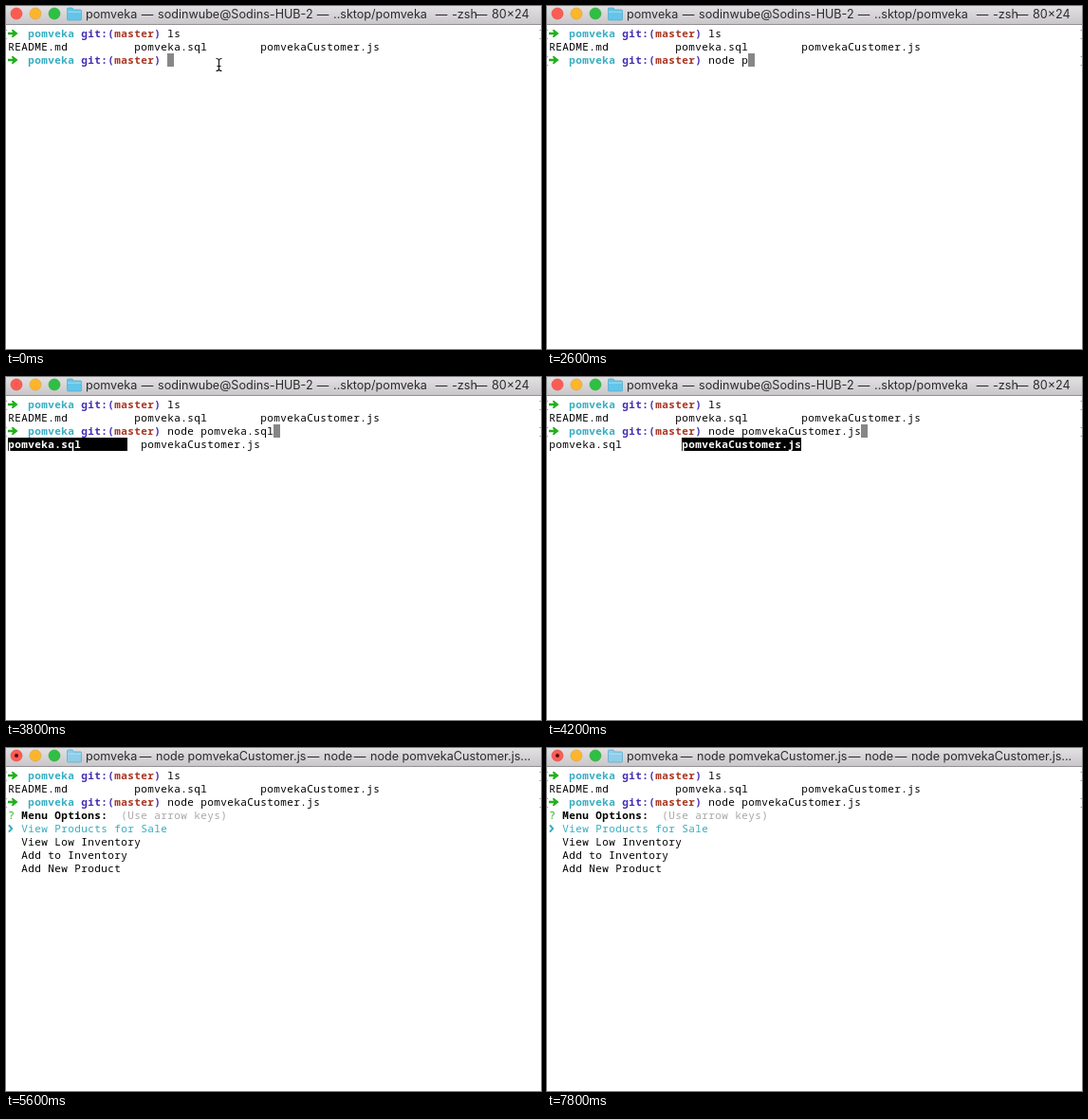
These frames come from a looping animation (564x362 px, 8000 ms). An HTML page:

```html
<!DOCTYPE html>
<html lang="en">
<head>
<meta charset="utf-8">
<title>Terminal</title>
<style>
  html, body { margin: 0; width: 100%; height: 100%; overflow: hidden; background: #fff; }
  svg { display: block; width: 564px; height: 362px; }
  text { white-space: pre; }
  .term text { font: 11px "Noto Sans Mono", "DejaVu Sans Mono", monospace; letter-spacing: .4px; }
  .term .b { font-weight: 700; }
  .bar text { font: 12.6px Inter, Roboto, sans-serif; fill: #2b2a2c; }
</style>
</head>
<body>
<svg viewBox="0 0 564 362">
  <defs>
    <linearGradient id="chrome" x2="0" y2="1">
      <stop offset="0" stop-color="#e2e0e2"/>
      <stop offset="1" stop-color="#c9c7c9"/>
    </linearGradient>
  </defs>
  <rect width="564" height="362" fill="#fff"/>
  <g class="bar">
    <rect width="564" height="19" fill="url(#chrome)"/>
    <rect y="19" width="564" height="1" fill="#929092"/>
    <g stroke-width=".6">
      <circle cx="11" cy="8" r="6" fill="#fc5b53" stroke="#df4744"/>
      <circle cx="31" cy="8" r="6" fill="#fdb52b" stroke="#de9f34"/>
      <circle cx="51" cy="8" r="6" fill="#2fbf44" stroke="#27aa35"/>
    </g>
    <g id="title"></g>
  </g>
  <g class="term" id="term"></g>
</svg>
<script>
const LOOP = 8000;
const CELL = 7, ROW = 14, LEFT = 2, TOP = 22;
const NAME = 'pomveka', SQL = NAME + '.sql', JS = NAME + 'Customer.js';
const CYAN = '#36adc2', BLUE = '#442cb4', RED = '#a8341f', GREEN = '#22b11c', GREY = '#a8a8a8';

const titleBox = document.getElementById('title');
const termBox = document.getElementById('term');

// Window titles: folder position and colour, then parts joined by dashes
const titles = {
  shell: { x: 64, fill: '#63c5e9', parts: [[84, NAME], [160, 'sodinwube@Sodins-HUB-2'], [345, '..sktop/' + NAME], [470, '-zsh'], [512, '80×24']] },
  start: { x: 73, fill: '#63c5e9', parts: [[93, NAME], [169, 'node ' + JS], [349, 'node'], [403, '-zsh'], [446, '80×24']] },
  node: { x: 64, fill: '#8fcde8', busy: true, parts: [[84, NAME], [158, 'node ' + JS], [335, 'node'], [384, 'node ' + JS + '...']] }
};

const typed = 'node ' + NAME;
const steps = [
  { at: 0, cmd: '', mouse: true },
  { at: 1200, cmd: typed.slice(0, 1) },
  { at: 1400, cmd: typed.slice(0, 3) },
  { at: 1600, cmd: typed.slice(0, 4) },
  { at: 1800, cmd: typed.slice(0, 5) },
  { at: 2000, cmd: typed.slice(0, 6) },
  { at: 2600, cmd: typed.slice(0, 6), marks: true },
  { at: 2800, cmd: typed, marks: true },
  { at: 3200, cmd: typed, marks: true, list: true },
  { at: 3800, cmd: 'node ' + SQL, marks: true, list: true, pick: SQL },
  { at: 4200, cmd: 'node ' + JS, marks: true, list: true, pick: JS },
  { at: 4800, cmd: 'node ' + JS + ' ', marks: true },
  { at: 5200, cmd: 'node ' + JS, marks: true, run: true, title: 'start' },
  { at: 5400, cmd: 'node ' + JS, marks: true, run: true, title: 'node' },
  { at: 5600, cmd: 'node ' + JS, marks: true, menu: true, title: 'node' }
];

const colX = col => LEFT + col * CELL;
const rowY = row => TOP + row * ROW;
const label = (x, y, str, fill = '#000', bold = false) =>
  `<text x="${x}" y="${y}" fill="${fill}"${bold ? ' class="b"' : ''}>${str}</text>`;
const put = (col, row, str, fill, bold) => label(colX(col) + .2, rowY(row) + 11, str, fill, bold);
const block = (col, row, cols, fill) =>
  `<rect x="${colX(col)}" y="${rowY(row)}" width="${cols * CELL}" height="${ROW}" fill="${fill}"/>`;
const cursor = (col, row) => block(col, row, 1, '#878787');
const marks = row => label(-4, rowY(row) + 10.5, '[', '#8c8c8c') + label(561, rowY(row) + 10.5, ']', '#8c8c8c');

function prompt(row, cmd) {
  const y = rowY(row) + 7;
  return `<path d="M2 ${y - 1.2}h5l-1.2 -2.8h1.8l5 4l-5 4h-1.8l1.2 -2.8h-5z" fill="${GREEN}"/>` +
    put(3, row, NAME, CYAN, true) + put(11, row, 'git:(', BLUE, true) +
    put(16, row, 'master', RED, true) + put(22, row, ')', BLUE, true) + put(24, row, cmd);
}

function choice(col, row, str, picked) {
  return picked ? block(col, row, JS.length, '#000') + put(col, row, str, '#fff', true) : put(col, row, str);
}

function menu() {
  const items = ['View Low Inventory', 'Add to Inventory', 'Add New Product'];
  return put(0, 3, '?', GREEN) + put(2, 3, 'Menu Options:', '#000', true) +
    put(17, 3, '(Use arrow keys)', GREY) +
    `<path d="M3 81.3l3.2 3.7l-3.2 3.7" fill="none" stroke="${CYAN}" stroke-width="2"/>` +
    put(2, 4, 'View Products for Sale', CYAN) +
    items.map((item, i) => put(2, 5 + i, item)).join('');
}

function pointer() {
  const d = 'M221.5 55.5q3 0 3 2v9q0 2 -3 2M227.5 55.5q-3 0 -3 2v9q0 2 3 2M222.5 63.5h4';
  return `<path d="${d}" fill="none" stroke="#fff" stroke-width="2.4"/>` +
    `<path d="${d}" fill="none" stroke="#111" stroke-width="1.1"/>`;
}

function drawTitle({ x, fill, busy, parts }) {
  const dot = busy ? '<circle cx="11" cy="8" r="2" fill="#5c0a08"/>' : '';
  const folder = `<path d="M${x + .5} 14v-11q0 -1 1 -1h4.5l1.5 2h7q1 0 1 1v9q0 1 -1 1h-13q-1 0 -1 -1z" fill="${fill}" stroke="#4fa9cd" stroke-width=".7"/>` +
    `<path d="M${x + 1} 6.2h14" stroke="#b9e4f4" stroke-width=".8"/>`;
  titleBox.innerHTML = dot + folder + parts.map(([px, str], i) =>
    (i ? `<text x="${px - 11}" y="13" text-anchor="middle">—</text>` : '') +
    `<text x="${px}" y="13">${str}</text>`).join('');
}

function draw(s) {
  drawTitle(titles[s.title || 'shell']);
  let out = marks(0) + prompt(0, 'ls') +
    put(0, 1, 'README.md') + put(19, 1, SQL) + put(38, 1, JS) + prompt(2, s.cmd);
  if (s.marks) out += marks(2);
  if (s.list) out += choice(0, 3, SQL, s.pick === SQL) + choice(20, 3, JS, s.pick === JS);
  if (s.menu) out += menu();
  else out += s.run ? cursor(0, 3) : cursor(24 + s.cmd.length, 2);
  if (s.mouse) out += pointer();
  termBox.innerHTML = out;
}

let shown = null;
function tick() {
  const t = performance.now() % LOOP;
  const step = steps.filter(s => s.at <= t).pop();
  if (step !== shown) draw(shown = step);
  requestAnimationFrame(tick);
}
tick();
</script>
</body>
</html>
```
